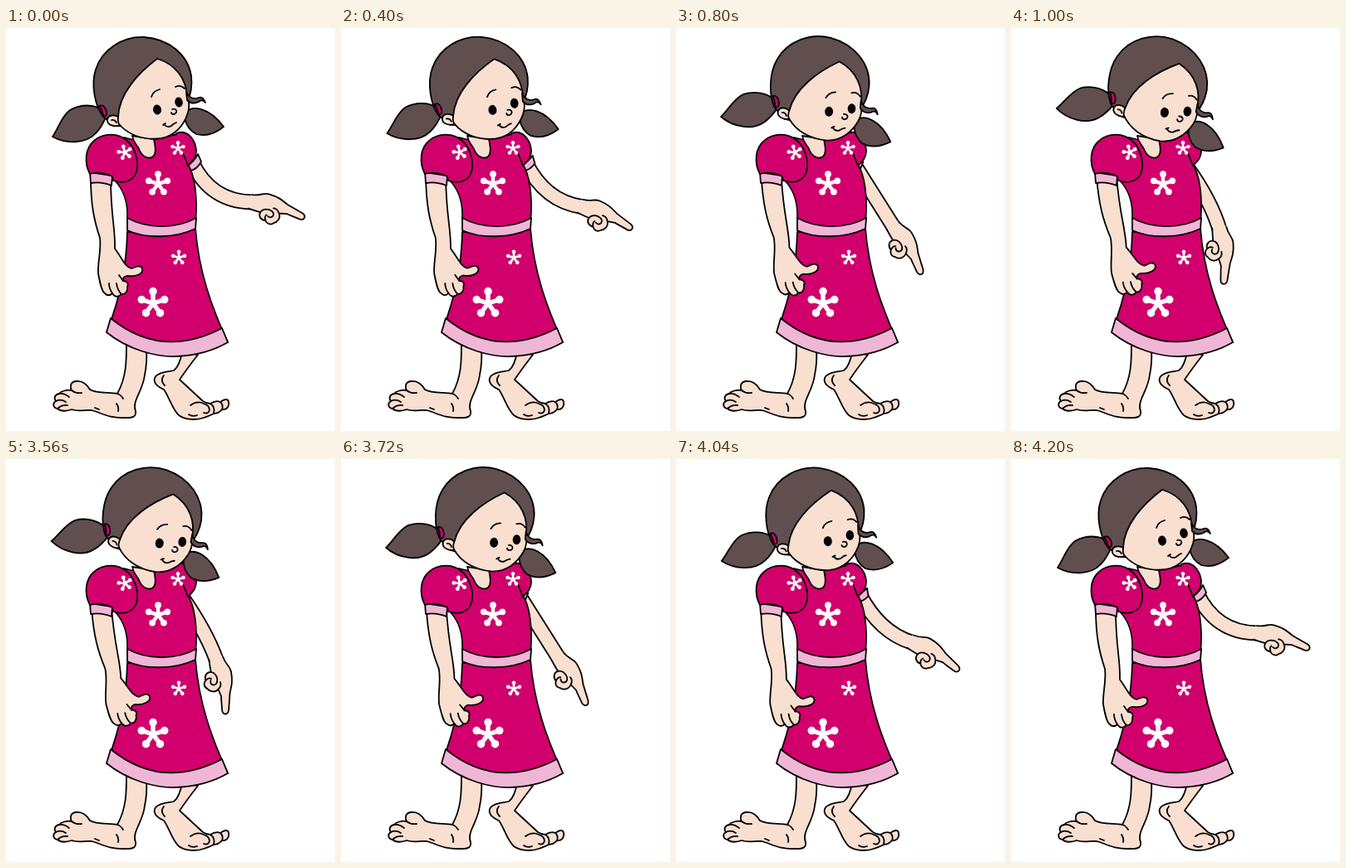
Write an HTML page that moves like this. It is 396 px wide and 486 px high and loops after 4960 ms.

```html
<!DOCTYPE html>
<html lang="en">
<head>
<meta charset="utf-8">
<title>Girl lowering her arm</title>
<style>
  html, body { margin: 0; height: 100%; overflow: hidden; background: #fff; }
  svg { display: block; width: 100%; height: 100%; }
  path, circle { stroke: #000; stroke-width: 1.8; stroke-linecap: round; stroke-linejoin: round; fill: none; }
  .skin { fill: #f8dfd0; }
  .hair { fill: #604f4e; }
  .dress { fill: #d1006c; }
  .trim { fill: #f0b6d5; }
  .ink { fill: #000; stroke: none; }
  .fill { stroke: none; }
  .flower path { stroke: #fff; }
  .flower circle { fill: #fff; stroke: none; }
  #armEdge, #armSkin { stroke-linecap: butt; }
  #armEdge { stroke-width: 18.8; }
  #armSkin { stroke: #f8dfd0; stroke-width: 15.2; }
</style>
</head>
<body>
<svg viewBox="0 0 396 486">
  <g id="legs">
    <path class="skin" d="M145 380C145 402 145 421 134 441C125 439 109 441 101 436C97 429 91 425 84 426C77 427 77 433 79 437C73 436 66 438 64 441C59 442 57 446 60 450C56 452 56 458 62 459C66 463 74 462 79 460C88 463 95 460 103 461C115 464 124 471 143 470C153 471 157 468 156 462C151 450 165 438 167 418Q170 404 169 388Z"/>
    <path d="M79 437Q84 441 91 440M64 441Q70 440 76 445M60 450Q66 447 72 451M62 459Q67 454 74 455M134 441Q138 442 141 447M107 458L112 460M133 453Q136 457 135 462"/>
    <path class="skin" d="M212 390Q209 408 202 413C194 415 182 415 179 422C177 429 183 433 190 436C197 446 200 460 208 467C216 473 230 473 238 470C243 468 247 467 250 465C256 465 259 461 260 460C265 461 269 457 268 451C267 446 262 448 258 451C254 449 249 451 246 453C242 453 240 452 237 450L209 424Q217 412 231 394Z"/>
    <path d="M190 419Q185 425 191 431M222 455Q230 449 238 453Q245 455 245 461Q243 466 238 464M246 453Q252 457 250 464M258 451Q262 455 260 460M220 466Q224 469 230 467"/>
  </g>

  <path id="armEdge"/>
  <path id="armSkin"/>
  <g id="hand">
    <path class="skin fill" d="M-4-7.7L0-8C8-9 10-15 17-15C28-15 33-13 42-9L62-4C68-2 67 4 61 4L44 2L35 4C39 9 36 15 32 17C29 21 24 20 22 17C16 18 12 14 13 9L-4 7.7Z"/>
    <path d="M-2-8.6C8-10 10-15 17-15C28-15 33-13 42-9L62-4C68-2 67 4 61 4C54 3 49 3 44 2L35 4C39 9 36 15 32 17C29 21 24 20 22 17C16 18 12 14 13 9Q5 9-2 8.6M13 9Q15 3 23 3Q30 4 29 9Q27 13 23 11M35 4Q32-1 27 0M22 17Q19 13 21 10"/>
  </g>
  <path id="cuff" class="trim" d="M219 166L223 172Q231 169 235 161L231 152Q227 160 219 166Z"/>

  <g id="body">
    <path class="dress" d="M146 246C145 284 139 320 122 365Q185 405 267 379C247 336 232 293 228 242Z"/>
    <path class="trim" d="M126 350L121 367C147 388 181 397 205 396C229 395 250 389 267 379L260 362Q187 400 126 350Z"/>
    <path class="dress" d="M142 132Q160 138 178 134L211 127L218 163C227 176 231 203 228 235Q184 252 146 230C147 211 141 195 132 185Z"/>
    <path class="trim" d="M146 229C169 242 204 243 229 229L228 242C203 254 167 254 146 244Z"/>
    <path class="dress" d="M205 127C218 122 228 134 229 148C229 157 224 161 219 166L213 151"/>
    <path class="skin" d="M152 130C153 139 158 140 161 148C164 155 172 159 177 155C181 151 180 144 178 134Z"/>
  </g>

  <g id="nearArm">
    <path class="skin" d="M102 180C102 213 106 232 113 253C115 268 110 283 111 296C113 307 115 318 119 320C123 324 126 322 128 320C131 325 135 325 139 321C144 322 147 316 146 312C148 309 146 305 141 305C140 301 144 298 148 299C155 300 166 297 164 290C162 285 156 288 151 290C143 288 140 278 131 266C132 244 126 226 126 182Z"/>
    <path d="M128 320Q124 314 124 308M139 321Q134 316 133 308M141 305L136 298"/>
  </g>
  <path class="trim" d="M101 174L102 187Q115 185 127 190L128 178Z"/>
  <path class="dress" d="M101 176C94 163 95 145 106 136C117 126 136 126 147 137C157 147 161 165 156 176C152 185 141 188 129 184L128 179Q114 172 101 176Z"/>
  <g id="flowers"></g>

  <g id="head">
    <path class="hair" d="M215 102C223 93 243 95 261 119C250 128 239 131 228 128Q217 122 214 109Z"/>
    <path class="hair" d="M117 100C105 91 88 92 76 99C66 106 62 121 55 131C71 140 95 140 107 127Q115 119 120 105Z"/>
    <path class="hair" d="M116 107C106 94 101 68 107 50C115 25 140 10 165 11C195 13 218 32 222 58Q224 75 217 89L190 120L130 118Z"/>
    <path class="skin" d="M181 37C204 44 216 62 217 83Q221 91 218 102C213 118 202 130 186 133C163 136 146 128 136 117C127 120 120 116 121 110C122 105 129 104 134 107C135 80 157 55 181 37Z"/>
    <path d="M126 111Q130 110 132 114M136 117Q133 114 134 107"/>
    <path class="hair" d="M216 77C219 85 226 86 231 84Q236 82 239 90Q235 85 231 89Q223 93 217 87Z"/>
    <path class="dress" d="M111 94Q117 91 120 101Q121 107 116 106Q115 99 111 94Z"/>
    <path d="M174 83Q176 76 184 74M203 71Q209 68 214 73M199 98C205 96 206 103 201 104Q198 104 198 102M189 116Q193 121 198 118Q201 115 204 114M188 117L191 115"/>
    <ellipse class="ink" cx="181" cy="98.5" rx="5" ry="6" transform="rotate(-10 181 98.5)"/>
    <ellipse class="ink" cx="207" cy="89.5" rx="4.8" ry="6" transform="rotate(-10 207 89.5)"/>
  </g>
</svg>

<script>
const STEP = 40, STEPS = 17, LOOP = 4960, LOWER_AT = 360, RAISE_AT = 3560;
const byId = id => document.getElementById(id);

// Arm keys: step, wrist x, wrist y, hand angle
const armKeys = [
  [0, 296, 210, 16],
  [5, 281, 224, 34],
  [12, 262, 240, 59],
  [17, 251, 243, 85]
];

const mix = (a, b, u) => a + (b - a) * u;

function armAt(step) {
  const i = Math.max(1, armKeys.findIndex(key => key[0] >= step));
  const from = armKeys[i - 1], to = armKeys[i];
  const u = (step - from[0]) / (to[0] - from[0]);
  return from.map((value, n) => mix(value, to[n], u)).slice(1);
}

function flower(x, y, radius, tilt) {
  let parts = '';
  for (let i = 0; i < 5; i++) {
    const angle = (tilt - 90 + i * 72) * Math.PI / 180;
    const px = x + Math.cos(angle) * radius * .76, py = y + Math.sin(angle) * radius * .76;
    parts += `<path d="M${x} ${y}L${px} ${py}" style="stroke-width:${radius * .29}"/>` +
      `<circle cx="${px}" cy="${py}" r="${radius * .25}"/>`;
  }
  return `<g class="flower">${parts}</g>`;
}

byId('flowers').innerHTML = [
  [143, 150, 9.5, -14], [207, 145, 9, 0], [183, 188, 15.5, 0],
  [208, 277, 9.5, 0], [177, 332, 19, 0]
].map(args => flower(...args)).join('');

function stepsSince(time, start) {
  return Math.min(STEPS, Math.max(0, Math.floor((time - start) / STEP) + 1));
}

function draw(now) {
  const time = now % LOOP;
  const step = stepsSince(time, LOWER_AT) - stepsSince(time, RAISE_AT);
  const p = step / STEPS;
  const [x, y, angle] = armAt(step);
  const curve = `M${mix(224, 212, p)} ${mix(162, 168, p)}Q${mix(246, 241, p)} ${mix(209, 209, p)} ${x} ${y}`;
  byId('armEdge').setAttribute('d', curve);
  byId('armSkin').setAttribute('d', curve);
  byId('hand').setAttribute('transform', `translate(${x} ${y}) rotate(${angle})`);
  byId('cuff').setAttribute('transform', `rotate(${65 * p} 217 150)`);
  byId('nearArm').setAttribute('transform', `rotate(${-4.4 * p} 113 165)`);
  byId('head').setAttribute('transform', `translate(1 0) rotate(${16.6 * p} 171 110)`);
}

const start = performance.now();
function tick() {
  draw(performance.now() - start);
  requestAnimationFrame(tick);
}
tick();
</script>
</body>
</html>
```
